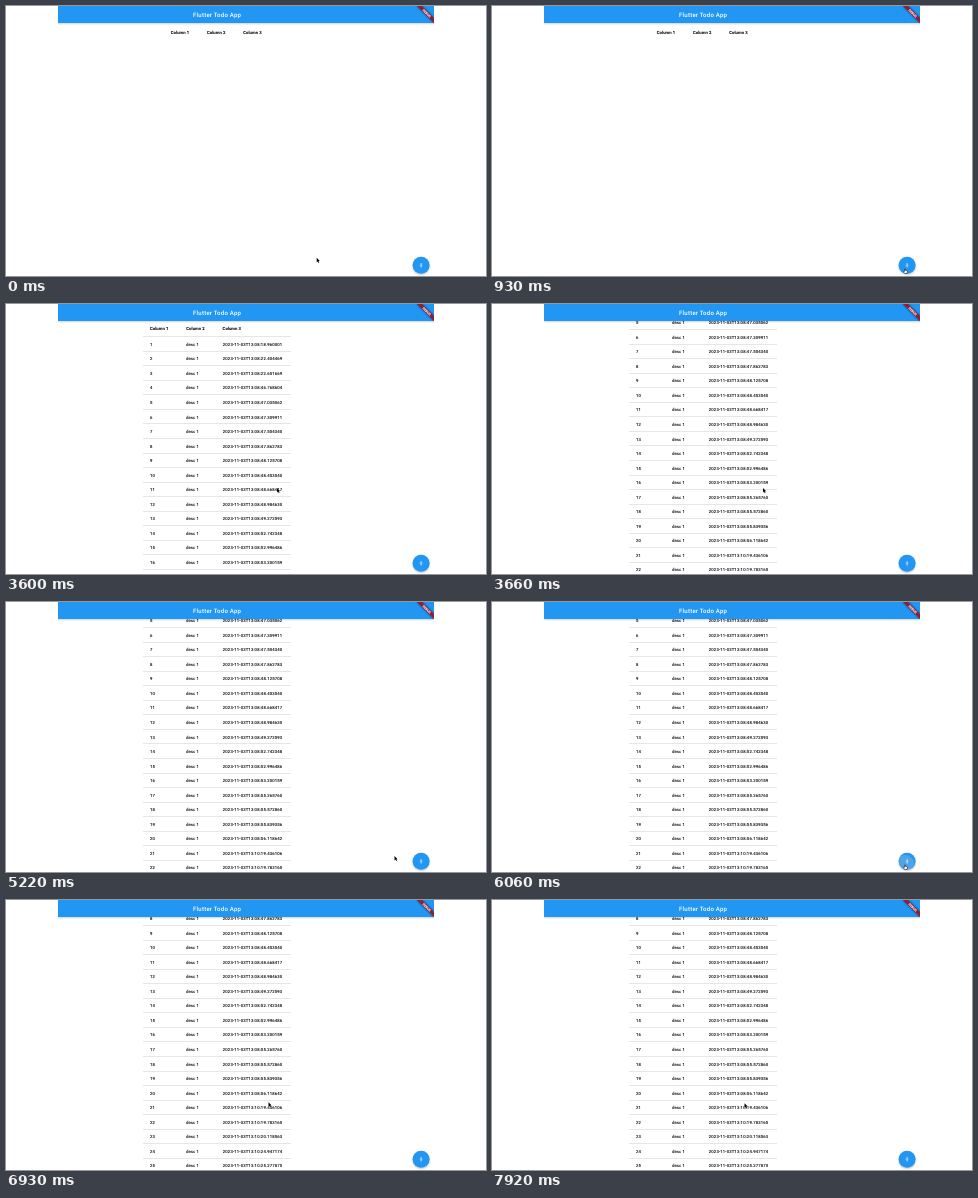
These frames come from a looping animation (480x270 px, 8000 ms). An HTML page:

```html
<!DOCTYPE html>
<html lang="en">
<head>
<meta charset="utf-8">
<title>Todo table</title>
<style>
  html, body { margin: 0; width: 100%; height: 100%; overflow: hidden; background: #fff; }
  svg { display: block; width: 100vw; height: 100vh; }
  text { font-family: Roboto, "Noto Sans", sans-serif; font-size: 4.24px; text-rendering: geometricPrecision; }
  #table text { stroke: #000; stroke-width: .1; }
  .cell { letter-spacing: .076px; }
  .date { letter-spacing: .16px; }
  .head { font-weight: 500; letter-spacing: .045px; }
  .title { font-size: 6.05px; font-weight: 500; fill: #fff; letter-spacing: .23px; }
  .debug { font-size: 3.3px; font-weight: 900; fill: #fff; }
  .line { fill: #e6e6e6; shape-rendering: crispEdges; }
</style>
</head>
<body>
<svg viewBox="0 0 480 270" xmlns="http://www.w3.org/2000/svg">
  <defs>
    <filter id="soft" x="-50%" y="-50%" width="200%" height="200%"><feGaussianBlur stdDeviation="1"/></filter>
    <clipPath id="app"><rect x="52" width="376" height="270"/></clipPath>
    <clipPath id="body"><rect x="52" y="17" width="376" height="253"/></clipPath>
    <clipPath id="disc"><circle r="8.5"/></clipPath>
  </defs>
  <rect width="480" height="270" fill="#fff"/>

  <g clip-path="url(#body)"><g id="table"></g></g>

  <g clip-path="url(#app)">
    <rect x="52" y="2" width="376" height="15.5" opacity=".25" filter="url(#soft)"/>
    <rect x="52" width="376" height="17" fill="#2196f3"/>
    <text class="title" x="211.1" y="10.7" text-anchor="middle">Flutter Todo App</text>
    <g transform="translate(428 0) rotate(45)">
      <rect x="-12.1" y="8.47" width="24.2" height="3.63" opacity=".5" filter="url(#soft)"/>
      <rect x="-12.1" y="8.47" width="24.2" height="3.63" fill="#a0182a" opacity=".85"/>
      <text class="debug" y="11.5" text-anchor="middle">DEBUG</text>
    </g>
  </g>

  <g transform="translate(415.1 259.3)">
    <circle cy="1" r="8.3" opacity=".28" filter="url(#soft)"/>
    <circle r="8.5" fill="#2196f3"/>
    <g clip-path="url(#disc)"><circle id="ripple" cx="-2" cy="3" fill="#c8c8c8"/></g>
    <path d="M0-2.2V2.2" stroke="#fff" stroke-width=".8"/>
    <path d="M-2.1 0H2.1" stroke="#fff" stroke-width=".4" opacity=".5"/>
  </g>

  <g id="cursor">
    <path id="arrow" d="M0 0V4.5L1 3.6L1.8 5.2L2.5 4.9L1.8 3.3H3.2Z"
      stroke="#fff" stroke-width=".4" paint-order="stroke"/>
    <path id="hand" d="M-.5 .4Q0-.2 .5 .4V1.9L2 2.2Q2.6 2.4 2.5 3L2 5H-.4L-1.7 3.1Q-1.5 2.4-.5 2.9Z"
      fill="#fff" stroke="#000" stroke-width=".5"/>
  </g>
</svg>
<script>
const LOOP = 8000, ROW = 14.52, TOP = 34.2, COUNT = 25;
const LOADED = 1410;
const CLICKS = [1290, 2610, 5610, 5880, 6150];

// Rows were added in bursts: first row number -> seconds after 13:08
const BURSTS = { 1: 18.96, 2: 22.4, 4: 46.76, 14: 52.74, 17: 55.26, 21: 139.43, 24: 144.94 };

// Pointer moves: begin, end, and where it comes to rest
const HOME = [310.7, 251.8], BUTTON = [413, 262.5];
const MOVES = [
  [480, 930, BUTTON],
  [3150, 3600, [271, 184]],
  [4710, 5460, BUTTON],
  [6390, 6720, [262.5, 202.3]],
  [7440, 7680, [252.5, 203.3]]
];

const $ = id => document.getElementById(id);
const ramp = (t, a, b) => Math.max(0, Math.min(1, (t - a) / (b - a)));
const smooth = u => u * u * (3 - 2 * u);

let seed = 11;
const random = () => (seed = seed * 16807 % 2147483647) / 2147483647;

function add(parent, tag, attrs, label) {
  const el = document.createElementNS("http://www.w3.org/2000/svg", tag);
  for (const k in attrs) el.setAttribute(k, attrs[k]);
  if (label) el.textContent = label;
  return parent.appendChild(el);
}

function stamp(sec) {
  const min = String(8 + Math.floor(sec / 60)).padStart(2, "0");
  return `2023-11-03T13:${min}:${(sec % 60).toFixed(6).padStart(9, "0")}`;
}

const table = $("table");
const heads = [1, 2, 3].map(n => add(table, "text", { class: "head", y: 27.6 }, "Column " + n));
const rows = add(table, "g", {});
let sec = 0;
for (let n = 1; n <= COUNT; n++) {
  const y = TOP + (n - 1) * ROW, base = y + ROW / 2 + 1.8;
  sec = (BURSTS[n] || sec + .2 + random() * .15) + random() * .01;
  add(rows, "rect", { class: "line", x: 137, y: y - .5, width: 148, height: 1 });
  add(rows, "text", { class: "cell", x: 144, y: base }, String(n));
  add(rows, "text", { class: "cell", x: 180, y: base }, "desc 1");
  add(rows, "text", { class: "date", x: 216.8, y: base }, stamp(sec));
}

// The vertical part of each move runs slightly ahead, which bends the path
function pointer(t) {
  let [x, y] = HOME;
  for (const [begin, end, [tx, ty]] of MOVES) {
    const u = ramp(t, begin, end);
    x += (tx - x) * smooth(u ** .8);
    y += (ty - y) * smooth(u ** .6);
  }
  return [x, y];
}

function draw(t) {
  const loaded = t >= LOADED;
  heads.forEach((h, i) => h.setAttribute("x", loaded ? 144 + i * 36.3 : 164.8 + i * 36.2));
  rows.setAttribute("visibility", loaded ? "visible" : "hidden");
  const scroll = 81 * ramp(t, 3600, 3660) + 3 * ROW * ramp(t, 6840, 6930);
  table.setAttribute("transform", `translate(0 ${-scroll})`);

  const click = CLICKS.filter(c => c <= t).pop();
  const k = click === undefined ? 1 : ramp(t, click, click + 270);
  $("ripple").setAttribute("r", 2 + 11 * k);
  $("ripple").setAttribute("opacity", .4 * Math.min(1, 2 - 2 * k));

  const [x, y] = pointer(t);
  const over = Math.hypot(x - 415.1, y - 259.3) < 8.5;
  $("cursor").setAttribute("transform", `translate(${x} ${y})`);
  $("arrow").setAttribute("visibility", over ? "hidden" : "visible");
  $("hand").setAttribute("visibility", over ? "visible" : "hidden");
}

const start = performance.now();
function tick() {
  draw((performance.now() - start) % LOOP);
  requestAnimationFrame(tick);
}
tick();
</script>
</body>
</html>
```
